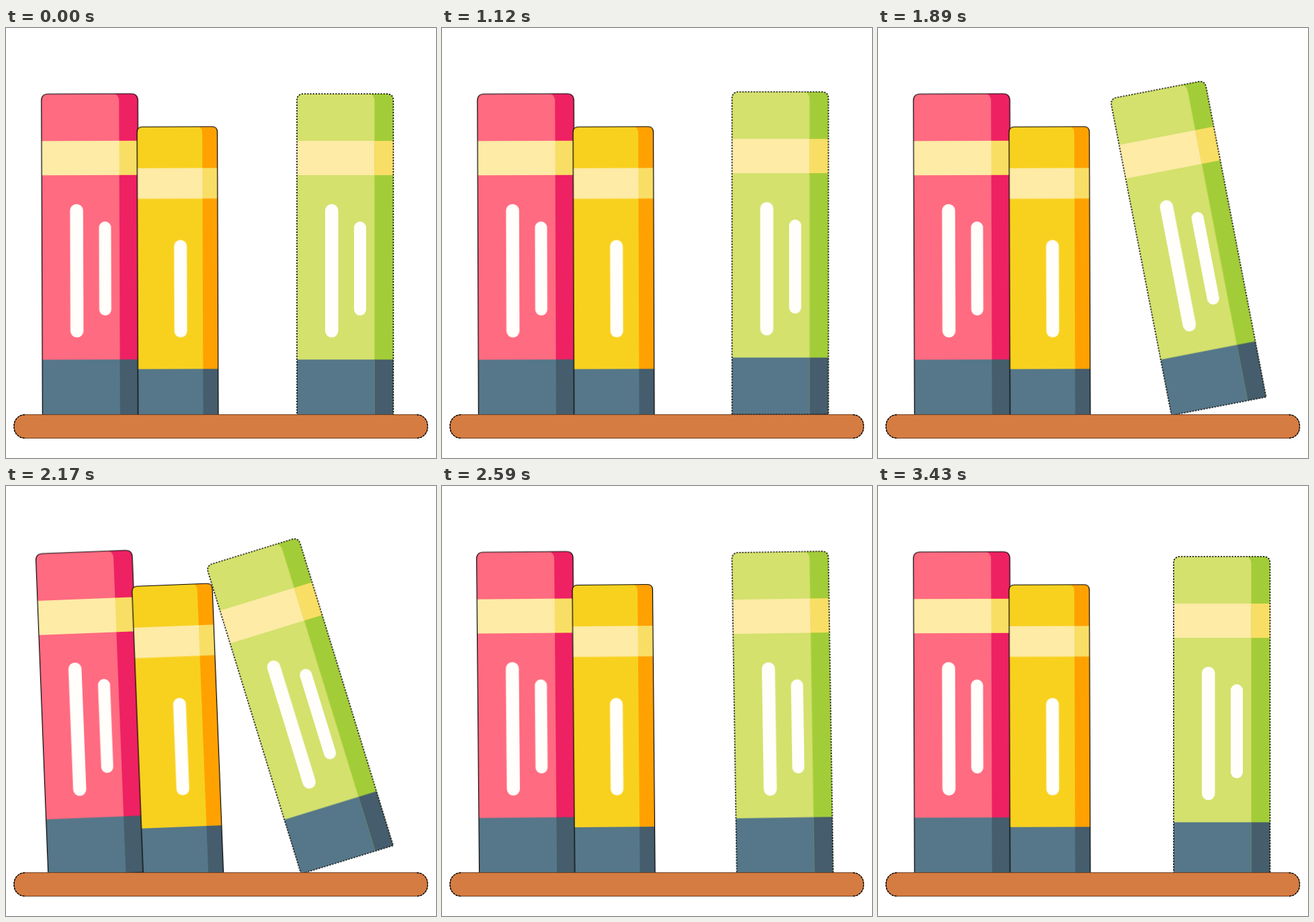
Animation of 640x640 px, one loop 4.2 s. Source, as an HTML page:

```html
<!DOCTYPE html>
<html lang="en">
<head>
<meta charset="utf-8">
<title>Falling book</title>
<style>
  html, body { margin: 0; width: 100%; height: 100%; overflow: hidden; background: #fff; }
  svg { display: block; width: 100%; height: 100%; }

  .pink { --main: #ff6b81; --side: #ee2163; }
  .green { --main: #d4e16d; --side: #a3cd38; --dash: 2.2 2; --line: 1.6; }
  .yellow { --main: #f8d11f; --side: #ffa201; }

  .main { fill: var(--main); }
  .side { fill: var(--side); }
  .band { fill: #fdeba6; }
  .band-side { fill: #f9de65; }
  .foot { fill: #557789; }
  .foot-side { fill: #455d6c; }
  .bar { fill: #fffefa; }
  .edge { fill: none; stroke: #000; stroke-width: var(--line, 1.2); stroke-dasharray: var(--dash, none); }
  .shelf { fill: #d57c42; stroke: #6b3e21; stroke-width: 1; }
  .cap { fill: none; stroke: #000; stroke-width: 1.4; stroke-dasharray: 3 1.5; }

  /* Paused: the script moves the clock in 70 ms steps through --t. */
  .tip, .lean {
    animation: tip 4200ms linear infinite paused;
    animation-delay: calc(var(--t, 0) * -1ms);
  }
  .lean { animation-name: lean; }

  @keyframes tip {
    0%      { transform: translate(433px, 578px) rotate(0deg); }
    16.667% { transform: translate(434px, 576.4px) rotate(0deg); }
    20%     { transform: translate(434px, 576px) rotate(0deg); }
    26.667% { transform: translate(431.6px, 575px) rotate(0deg); }
    27.5%   { transform: translate(431.5px, 575px) rotate(0deg);
              animation-timing-function: cubic-bezier(.333, 0, .667, .333); }
    49.167% { transform: translate(439.600px, 577.4px) rotate(-16.8deg);
              animation-timing-function: ease-out; }
    53.333% { transform: translate(439px, 577.4px) rotate(-17.2deg); }
    55%     { transform: translate(438.8px, 578.4px) rotate(-13.6deg); }
    56.667% { transform: translate(438.5px, 578.8px) rotate(-9.4deg);
              animation-timing-function: ease-out; }
    63.333% { transform: translate(438.8px, 579.2px) rotate(0deg); }
    70%     { transform: translate(439px, 579.5px) rotate(0deg); }
    81.667%, 100% { transform: translate(440px, 585px) rotate(0deg); }
  }

  @keyframes lean {
    0%, 49.167% { transform: rotate(-.2deg); animation-timing-function: ease-out; }
    53.333% { transform: rotate(-2.8deg); }
    56.667% { transform: rotate(-2.5deg); animation-timing-function: ease-in-out; }
    63.333%, 100% { transform: rotate(-.2deg); }
  }
</style>
</head>
<body>
<svg viewBox="0 0 640 640">
  <defs>
    <!-- Books stand on the origin, which is their lower left corner. -->
    <g id="tall">
      <path class="side" d="M0 0V-470Q0-480 10-480H133.500Q143.500-480 143.500-470V0Z"/>
      <path class="main" d="M0 0V-470Q0-480 10-480H107.500Q115.500-479 115.500-469V0Z"/>
      <path class="band" d="M0-410H115.500V-359H0Z"/>
      <path class="band-side" d="M115.500-410H143.500V-359H115.500Z"/>
      <path class="foot" d="M0-84.500H115.500V0H0Z"/>
      <path class="foot-side" d="M115.500-84.500H143.500V0H115.500Z"/>
      <rect class="bar" x="42" y="-316" width="19.500" height="198.500" rx="9.750"/>
      <rect class="bar" x="85" y="-290" width="18" height="140" rx="9"/>
      <path class="edge" d="M0 0V-470Q0-480 10-480H133.500Q143.500-480 143.500-470V0Z"/>
    </g>
    <g id="short">
      <path class="side" d="M0 0V-425Q0-433 8-433H111.500Q119.500-433 119.500-425V0Z"/>
      <path class="main" d="M0 0V-425Q0-433 8-433H90Q97-432 97-424V0Z"/>
      <path class="band" d="M0-371.500H97V-326H0Z"/>
      <path class="band-side" d="M97-371.500H119.500V-326H97Z"/>
      <path class="foot" d="M0-72.500H97V0H0Z"/>
      <path class="foot-side" d="M97-72.500H119.500V0H97Z"/>
      <rect class="bar" x="54.500" y="-264.500" width="19" height="145" rx="9.500"/>
      <path class="edge" d="M0 0V-425Q0-433 8-433H111.500Q119.500-433 119.500-425V0Z"/>
    </g>
  </defs>

  <g transform="translate(125 338)">
    <g class="lean pink"><use href="#tall" x="-71.500" y="240"/></g>
  </g>
  <g transform="translate(255.800 363.500)">
    <g class="lean yellow"><use href="#short" x="-60" y="216.500"/></g>
  </g>
  <g class="tip green"><use href="#tall"/></g>
  <rect class="shelf" x="12" y="575.500" width="615.500" height="35" rx="16"/>
  <path class="cap" d="M28 575.500A16 16 0 0 0 12 591.500V594.500A16 16 0 0 0 28 610.500"/>
  <path class="cap" d="M611.500 575.500A16 16 0 0 1 627.500 591.500V594.500A16 16 0 0 1 611.500 610.500"/>
</svg>
<script>
  const LOOP = 4200, STEP = 70;
  const root = document.documentElement;

  function tick() {
    const t = performance.now() % LOOP;
    root.style.setProperty('--t', Math.floor(t / STEP) * STEP);
    requestAnimationFrame(tick);
  }
  tick();
</script>
</body>
</html>
```
